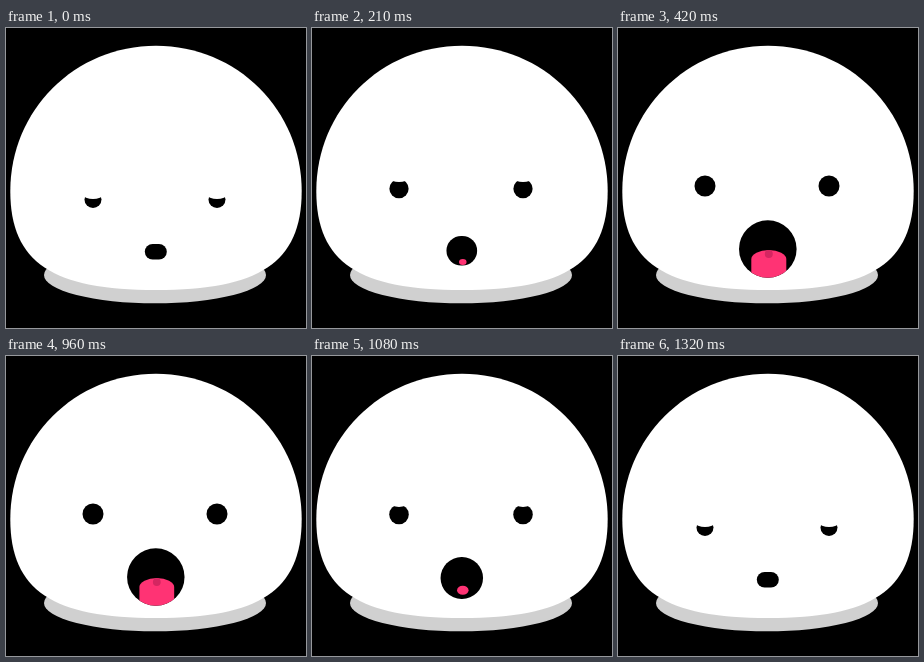
Animation of 300x300 px, one loop 1350 ms. Source, as an HTML page with a canvas:

```html
<!DOCTYPE html>
<html lang="en">
<head>
<meta charset="utf-8">
<title>Yawning blob</title>
<style>
  html, body { margin: 0; width: 100%; height: 100%; overflow: hidden; background: #000; }
  canvas { display: block; width: 300px; height: 300px; }
</style>
</head>
<body>
<canvas id="stage" width="300" height="300"></canvas>
<script>
const ctx = document.getElementById('stage').getContext('2d');
const LOOP = 1350, STEP = 30;

const lerp = (a, b, k) => a + (b - a) * k;
const ramp = (t, from, to) => {
  const p = Math.min(1, Math.max(0, (t - from) / (to - from)));
  return p * p * (3 - 2 * p);
};
// Rises over [a, b], falls back over [c, d]
const pulse = (t, a, b, c, d) => ramp(t, a, b) - ramp(t, c, d);

function ellipse(x, y, rx, ry, color) {
  ctx.fillStyle = color;
  ctx.beginPath();
  ctx.ellipse(x, y, rx, ry, 0, 0, Math.PI * 2);
  ctx.fill();
}

function body() {
  ellipse(149, 247, 111, 28.3, '#d0d0d0');
  ctx.fillStyle = '#fff';
  ctx.beginPath();
  ctx.moveTo(4.3, 163);
  ctx.bezierCurveTo(4.3, 82, 69, 17.8, 150, 17.8);
  ctx.bezierCurveTo(231, 17.8, 295.7, 82, 295.7, 163);
  ctx.bezierCurveTo(295.7, 235, 253, 262, 150, 262);
  ctx.bezierCurveTo(47, 262, 4.3, 235, 4.3, 163);
  ctx.fill();
}

// A round eye whose upper part is hidden by a curved white lid
function eye(x, t) {
  const open = pulse(t, 105, 300, 950, 1270);
  const rise = pulse(t, 0, 295, 1050, 1320);
  const y = lerp(171.5, 158, rise);
  const r = lerp(8.5, 10.5, open);
  const lid = y + lerp(-0.5, -11.5, open);
  ellipse(x, y, r, r, '#000');
  ellipse(x, lid - 18, 18, 18, '#fff');
}

function tongue(s) {
  if (s <= 0) return;
  const tip = Math.max(0, (s - 0.65) / 0.35);
  const w = 17.5 * s;
  const top = 233.5 - 11.5 * s;
  const h = 18 * Math.min(1, s / 0.65) + 22 * tip;
  const r = Math.min(9, h / 2);
  ctx.fillStyle = '#ff3374';
  ctx.beginPath();
  ctx.ellipse(150.8, top + r, w, r, 0, Math.PI, Math.PI * 2);
  ctx.ellipse(150.8, top + h - r, w, r, 0, 0, Math.PI);
  ctx.fill();
  if (tip > 0) ellipse(150.8, top + 4, 4 * tip, 4 * tip, '#d42661');
}

function mouth(t) {
  const grow = pulse(t, 90, 400, 950, 1263);
  const narrow = pulse(t, 0, 120, 1200, 1320);
  const w = lerp(lerp(11, 8.6, narrow), 28.8, grow);
  const h = lerp(7.8, 28.8, grow);
  const y = lerp(223.7, 221, grow);
  ctx.save();
  ctx.fillStyle = '#000';
  ctx.beginPath();
  ctx.roundRect(149.8 - w, y - h, w * 2, h * 2, Math.min(w, h));
  ctx.fill();
  ctx.clip();
  tongue(pulse(t, 120, 420, 950, 1161));
  ctx.restore();
}

function draw(t) {
  ctx.fillStyle = '#000';
  ctx.fillRect(0, 0, 300, 300);
  body();
  eye(87, t);
  eye(211, t);
  mouth(t);
}

const start = performance.now();
function tick() {
  const t = (performance.now() - start) % LOOP;
  draw(Math.floor(t / STEP) * STEP);
  requestAnimationFrame(tick);
}
tick();
</script>
</body>
</html>
```
